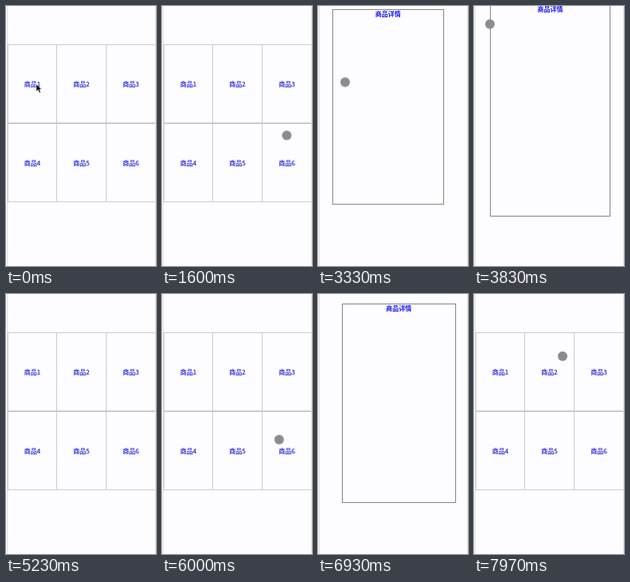
Animation, 188 px wide and 326 px high, one loop 8000 ms. Source, as an HTML page:

```html
<!DOCTYPE html>
<html lang="zh-CN">
<head>
<meta charset="utf-8">
<title>商品</title>
<style>
  html, body { margin: 0; width: 100%; height: 100%; overflow: hidden; background: #fdfcfe; }
  #stage {
    position: relative; width: 188px; height: 326px; overflow: hidden;
    font: 500 8px/11px "Noto Sans CJK SC", "Noto Sans CJK", sans-serif;
    color: #1a14dc; text-align: center;
  }
  #stage * { position: absolute; box-sizing: border-box; }
  .side { top: 0; width: 1px; height: 326px; background: #dedde0; }
  #grid { inset: 0; background: #fdfcfe; }
  .cell { height: 99px; border: 1px solid #cbcbcd; }
  .cell span { left: 0; right: 0; top: 43px; -webkit-text-stroke: .15px; }
  #card { border: 1px solid #838583; color: #1414f0; font-weight: 700; }
  #card span { left: 0; right: 0; top: -1px; }
  #dot { left: -6.5px; top: -6.5px; width: 12.5px; height: 12.5px; border-radius: 50%; background: #8c8b8d; }
  #arrow { left: 37px; top: 97px; }
</style>
</head>
<body>
<div id="stage">
  <div id="card"><span>商品详情</span></div>
  <div id="grid"></div>
  <div class="side" style="left:1px"></div>
  <div class="side" style="left:187px"></div>
  <svg id="arrow" width="9" height="14" viewBox="0 0 9 14">
    <path d="M1 1V10.2L3.2 8.2L4.8 12L6.5 11.3L4.9 7.6H7.8Z" fill="#000" stroke="#fff" stroke-width=".6"/>
  </svg>
  <div id="dot"></div>
</div>
<script>
const LOOP = 8000;
const $ = id => document.getElementById(id);

const edge = col => Math.floor(2 + 61.7 * col);
for (let i = 0; i < 6; i++) {
  const col = i % 3, row = Math.floor(i / 3);
  const cell = document.createElement('div');
  cell.className = 'cell';
  cell.style.cssText =
    `left:${edge(col)}px; top:${48 + 99 * row}px; width:${edge(col + 1) + 1 - edge(col)}px`;
  cell.innerHTML = `<span>商品${i + 1}</span>`;
  $('grid').append(cell);
}

// Each step: [time in ms, properties, easing towards the next step]
function play(id, steps) {
  const frames = steps.map(([t, props, easing = 'linear']) => ({ offset: t / LOOP, easing, ...props }));
  $(id).animate(frames, { duration: LOOP, iterations: Infinity });
}

// Visible from the start, then switched at each given time
function toggle(id, ...times) {
  const steps = [0, ...times].map((t, i) => [t, { opacity: 1 - i % 2 }, 'step-end']);
  play(id, [...steps, [LOOP, steps.at(-1)[1]]]);
}

toggle('grid', 2600, 5230, 6070, 7560);
toggle('arrow', 30);

// The card grows out of the tapped cell; the grid covers it otherwise
const box = (x, y, w, h) => ({ left: x + 'px', top: y + 'px', width: w + 'px', height: h + 'px' });
const first = box(2, 48, 62, 99);
const last = box(126, 147, 62, 99);
const open = box(20, -2, 151, 266);

play('card', [
  [0, first],
  [2600, first, 'cubic-bezier(.5, 0, .5, 1)'],
  [3600, open, 'step-end'],
  [6070, last, 'cubic-bezier(.23, 0, .54, 1)'],
  [7210, open],
  [LOOP, open]
]);

// Pointer moves: start, end, then stops spread evenly over that time
const moves = [
  [30, 230, [38, 102], [33, 193]],
  [570, 1100, [33, 193], [41, 100]],
  [1270, 2070, [41, 100], [157, 100], [156, 195], [29, 190], [36, 94]],
  [2830, 3330, [36, 94], [34, 95.5]],
  [3430, 4000, [34, 95.5], [14, -8]],
  [5260, 6030, [14, -8], [152, 190]],
  [6040, 6900, [152, 190], [141.5, 184], [14, -8]],
  [7600, 7970, [26, -8], [50, 194], [146, 160], [111, 78]]
];
const at = (t, [x, y], easing) => [t, { transform: `translate(${x}px, ${y}px)` }, easing];
const path = moves.flatMap(([start, end, ...stops]) =>
  stops.map((stop, i) => at(start + (end - start) * i / (stops.length - 1), stop)));
play('dot', [at(0, [38, -10], 'step-end'), ...path, at(LOOP, [111, 78])]);
</script>
</body>
</html>
```
